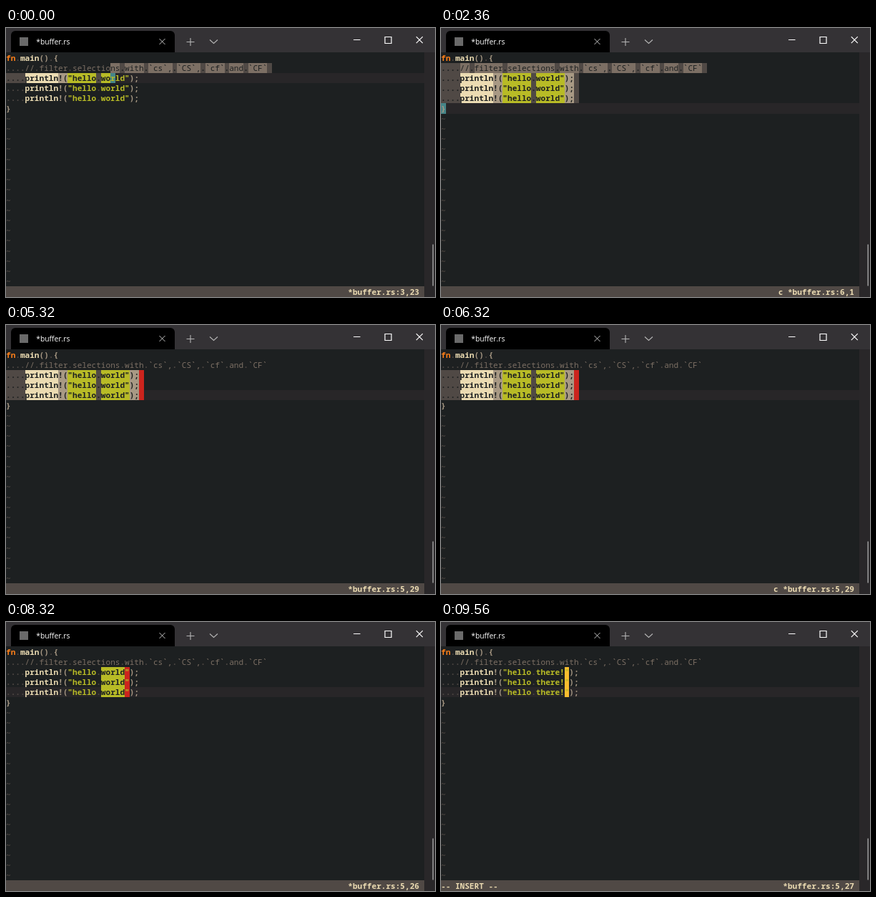
Recreate the animation shown at these times as an HTML page with a canvas. Size 600x376 px, loop 10000 ms.

```html
<!DOCTYPE html>
<html lang="en">
<head>
<meta charset="utf-8">
<title>Editor selections</title>
<style>
html, body { margin: 0; width: 100%; height: 100%; overflow: hidden; background: #1d2021; }
canvas { display: block; width: 600px; height: 376px; }
</style>
</head>
<body>
<canvas id="stage" width="600" height="376"></canvas>
<script>
const ctx = document.getElementById('stage').getContext('2d');
const LOOP = 10000, CELL = 6.643, TOP = 34.3, ROW = 14.22, EDGE = 585;
const MONO = '11.07px "Noto Sans Mono", "DejaVu Sans Mono", monospace';

const C = {
  bg: '#1d2021', line: '#282628', fg: '#ebdbb2', punct: '#a89984', green: '#b8bb26',
  orange: '#fe8019', comment: '#7c6f64', space: '#504945', bar: '#504945', input: '#665c54',
  teal: '#458588', red: '#cc241d', yellow: '#fabd2f'
};

const px = col => Math.round(col * CELL);
const py = row => Math.round(TOP + row * ROW);

function box(color, x, y, w, h) {
  ctx.fillStyle = color;
  ctx.fillRect(x, y, w, h);
}

function cellBox(color, row, col, n = 1) {
  box(color, px(col), py(row), px(col + n) - px(col), py(row + 1) - py(row));
}

function glyph(ch, color, row, col, weight = 600) {
  ctx.font = weight + ' ' + MONO;
  ctx.fillStyle = color;
  ctx.fillText(ch, col * CELL, TOP + row * ROW + 11.2);
}

function write(text, row, col, color) {
  [...text].forEach((ch, i) => { if (ch !== ' ') glyph(ch, color, row, col + i); });
}

function strokes(color, width, ...paths) {
  ctx.strokeStyle = color;
  ctx.lineWidth = width;
  ctx.beginPath();
  for (const [x, y, ...rest] of paths) {
    ctx.moveTo(x, y);
    for (let i = 0; i < rest.length; i += 2) ctx.lineTo(rest[i], rest[i + 1]);
  }
  ctx.stroke();
}

function cross(color, width, x, y, r) {
  strokes(color, width, [x - r, y - r, x + r, y + r], [x + r, y - r, x - r, y + r]);
}

// Each line is a list of [text, colour, weight] tokens, flattened to cells.
function toCells(tokens) {
  return tokens.flatMap(([text, color, weight]) => [...text].map(ch =>
    ch === ' ' ? { ch: '.', color: C.space } : { ch, color, weight }));
}

function buildLines(word) {
  const call = toCells([['    println', C.fg], ['!(', C.punct],
    ['"hello ' + word + '"', C.green], [');', C.punct]]);
  return [
    toCells([['fn', C.orange, 700], [' main', C.fg], ['() {', C.punct]]),
    toCells([['    // filter selections with `cs`, `CS`, `cf` and `CF`', C.comment, 500]]),
    call, call, call,
    toCells([['}', C.punct]])
  ];
}

// Text typed so far, one character per key time.
const typed = (text, times, t) => text.slice(0, times.filter(k => t >= k).length);
const during = (t, from, to) => t >= from && t < to;

// A selection runs from its anchor to its cursor, both [row, col].
const eachCall = (from, to) => [2, 3, 4].map(r => ({ from: [r, from], to: [r, to] }));

function stateAt(t) {
  const s = { word: 'world', cursor: C.red, keys: '', prompt: null, insert: false };
  if (t < 5320) {
    s.cursor = C.teal;
    s.sels = t < 1080
      ? [{ from: [1, 22], to: [t < 640 ? 2 : t < 1000 ? 3 : 4, 22] }]
      : [{ from: [1, 0], to: [5, 0] }];
  } else if (t < 8080) {
    s.sels = eachCall(0, 28);
  } else if (t < 8600) {
    s.sels = eachCall(20, 25);
  } else {
    s.insert = true;
    s.cursor = C.yellow;
    s.word = typed('there!', [8840, 8920, 9040, 9120, 9240, 9520], t);
    s.sels = eachCall(20 + s.word.length, 20 + s.word.length);
  }
  if (during(t, 2360, 3600) || during(t, 6320, 6520)) s.keys = 'c ';
  if (during(t, 3800, 5320)) s.prompt = typed('pri', [4400, 4640, 4880], t);
  if (during(t, 6520, 8080)) s.prompt = typed('world', [6920, 7000, 7080, 7160, 7280], t);
  return s;
}

function isSelected(sels, row, col) {
  const at = ([r, c]) => r * 100 + c, p = row * 100 + col;
  return sels.some(s => p >= at(s.from) && p <= at(s.to));
}

function drawBuffer(s) {
  const current = s.sels[s.sels.length - 1].to;
  box(C.line, 0, py(current[0]), EDGE, py(current[0] + 1) - py(current[0]));
  const end = { ch: '', color: C.space };
  buildLines(s.word).forEach((cells, row) => {
    [...cells, end].forEach((cell, col) => {
      const onCursor = s.sels.some(({ to }) => to[0] === row && to[1] === col);
      const picked = !onCursor && isSelected(s.sels, row, col);
      if (onCursor) cellBox(s.cursor, row, col);
      if (picked) cellBox(cell.color, row, col);
      glyph(cell.ch, picked ? C.bg : cell.color, row, col, cell.weight);
    });
  });
  for (let row = 6; row < 23; row++) glyph('~', C.space, row, 0);
}

function drawStatus(s) {
  box(C.bar, 0, py(23), EDGE, 376 - py(23));
  if (s.prompt !== null) {
    const label = 'split-by:', n = label.length;
    cellBox(C.bg, 23, 0, n);
    cellBox(C.input, 23, n, s.prompt.length);
    cellBox(C.red, 23, n + s.prompt.length);
    write(label + s.prompt, 23, 0, C.fg);
    return;
  }
  if (s.insert) write('-- INSERT --', 23, 0, C.fg);
  const [row, col] = s.sels[s.sels.length - 1].to;
  const info = `${s.keys}*buffer.rs:${row + 1},${col + 1}`;
  write(info, 23, 87 - info.length, C.fg);
}

function drawWindow() {
  box(C.bg, 0, 0, 600, 376);
  box('#343235', 0, 0, 600, 34);
  ctx.fillStyle = '#000';
  ctx.beginPath();
  ctx.roundRect(7, 4, 229, 30, [6, 6, 0, 0]);
  ctx.fill();
  box('#6a6a6a', 19, 13, 12, 12);
  ctx.font = '500 10.3px "Open Sans", "Noto Sans", sans-serif';
  ctx.fillStyle = '#fff';
  ctx.fillText('*buffer.rs', 42.3, 23);
  cross('#c4c4c4', 1, 218.5, 19, 4);
  strokes('#b4b4b4', 1.1, [252.5, 19.5, 263.5, 19.5], [258, 14, 258, 25], [285, 16.5, 290.5, 21.5, 296, 16.5]);
  strokes('#fff', 1.2, [486, 16.5, 495.5, 16.5], [530, 12.5, 539, 12.5, 539, 21.5, 530, 21.5, 530, 12]);
  cross('#fff', 1.2, 578.3, 16.7, 4.5);
  box('#292729', EDGE, 34, 600 - EDGE, 342);
  box('#9d9c9d', 596.5, 302.5, 1.5, 58);
}

function frame(now) {
  const s = stateAt(now % LOOP);
  drawWindow();
  drawBuffer(s);
  drawStatus(s);
  requestAnimationFrame(frame);
}
requestAnimationFrame(frame);
</script>
</body>
</html>
```
